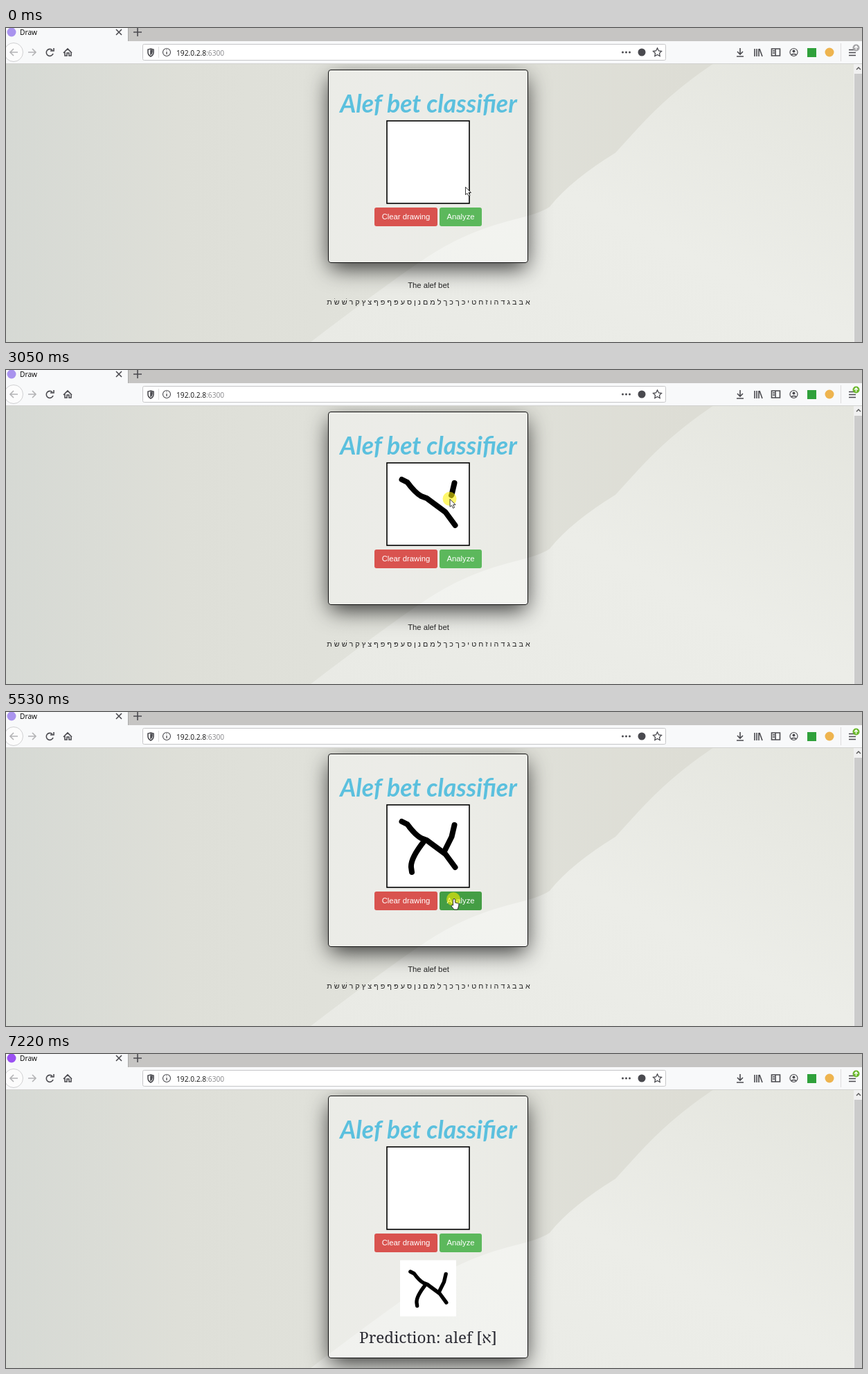
Animation, 1236 px wide and 453 px high, one loop 7.86 s. Source, as an HTML page:

```html
<!DOCTYPE html>
<html lang="en">
<head>
<meta charset="utf-8">
<title>Draw</title>
<style>
  html, body { margin: 0; width: 100%; height: 100%; overflow: hidden; }
  svg { position: absolute; left: 0; top: 0; width: 1236px; height: 453px; }
  text { font: 11.3px "Liberation Sans", Arial, sans-serif; }
  .mid { text-anchor: middle; }
  .ui { font: 10.2px "Open Sans", "Noto Sans", sans-serif; }
  .title { font: italic 700 35.6px Lato, sans-serif; fill: #5bc0de; }
  .letters { font-size: 10.8px; }
  .result { font: 22.5px "Noto Serif", serif; fill: #2b2b33; }
  .icon { fill: none; stroke: #4a4a4f; stroke-width: 1.6; }
  .ink { fill: none; stroke: #000; stroke-width: 8; stroke-linecap: round; stroke-linejoin: round; }
  #copy { filter: blur(.6px); }
  #panel {
    position: absolute; left: 465px; top: 60px; width: 289px; box-sizing: border-box;
    border: 1px solid #111; border-radius: 4px; background: rgba(255, 255, 255, .34);
    box-shadow: 0 10px 32px -3px rgba(0, 0, 0, .8);
  }
</style>
</head>
<body>
<svg viewBox="0 0 1236 453">
  <defs>
    <linearGradient id="wall">
      <stop offset="0" stop-color="#d6d9d4"/>
      <stop offset=".2" stop-color="#dedfd8"/>
      <stop offset=".45" stop-color="#e1e2db"/>
      <stop offset=".8" stop-color="#dddDD5"/>
    </linearGradient>
    <linearGradient id="hill" x1="0" y1="1" x2="1" y2="0">
      <stop offset="0" stop-color="#e9eae5"/>
      <stop offset=".5" stop-color="#ecede8"/>
      <stop offset="1" stop-color="#e4e5de"/>
    </linearGradient>
  </defs>
  <path fill="url(#wall)" d="M0 51H1236V453H0z"/>
  <path fill="url(#hill)" d="M1022 51Q960 92 912 145L880 180Q815 220 785 258Q770 268 735 276Q670 292 620 323T440 453H1236V51z"/>
</svg>

<div id="panel"></div>

<svg viewBox="0 0 1236 453">
  <!-- browser chrome -->
  <path fill="#c6c5c3" d="M0 0H1236V19H0z"/>
  <path fill="#f8f9fa" d="M0 0H176V19H1236V51H0z"/>
  <path stroke="#a9a9a9" d="M176.5 0V19"/>
  <path stroke="#d2d2d0" d="M0 51.5H1236"/>
  <circle id="burst" cx="8" cy="6" fill="#6db3ff"/>
  <circle id="favicon" cx="8" cy="6" r="6.5"/>
  <text class="ui" x="20" y="10">Draw</text>
  <g class="icon">
    <path d="M159 2l8 8m0-8l-8 8M184 6h12m-6-6v12"/>
    <g stroke="#b4b4b6">
      <circle cx="11" cy="35" r="13.5" stroke="#d0d0d2" stroke-width="1" fill="#fcfcfc"/>
      <path d="M17 35H6m5-5l-5 5 5 5M32 35H43m-5-5l5 5-5 5"/>
    </g>
    <path id="reload" d="M67 32A5 5 0 1 0 68 37M69 29v4h-5"/>
    <path id="stop" stroke="#8a8a8e" d="M58 30l10 10m0-10l-10 10"/>
    <path d="M83 36l6-6 6 6M85 35v5h3v-4h3v4h3v-5"/>
    <rect x="197.5" y="23.5" width="755" height="23" rx="2" fill="#fff" stroke="#c6c6c8" stroke-width="1"/>
    <path d="M209 30l4 1v4q0 4-4 6-4-2-4-6v-4z"/>
    <path d="M209 32v6q2-1 2-4v-2z" fill="#4a4a4f"/>
    <path stroke="#ddd" stroke-width="1" d="M220.5 27v16M1205.5 22v26"/>
    <circle cx="232" cy="35" r="5.5" stroke-width="1.1"/>
    <path stroke-width="1.3" d="M232 34v4m0-7v1"/>
    <path stroke-width="3" stroke-linecap="round" stroke-dasharray="0 5" d="M890.5 35h11"/>
    <circle cx="918" cy="35" r="5.5" fill="#4a4a4f" stroke="none"/>
    <path stroke-width="1.3" d="M940.5 29l2 4 4 .5-3 3 .7 4-3.7-2-3.7 2 .7-4-3-3 4-.5z"/>
    <path d="M1060 29v9m-4-4l4 4 4-4M1055 41h10"/>
    <path d="M1081 30v11m3-11v11m3-11v11m1-11l4 11"/>
    <path d="M1105.5 30h12v10h-12zM1111 30v10m-4-7h3m-3 3h3"/>
    <circle cx="1137.5" cy="35" r="5.5" stroke-width="1.2"/>
    <circle cx="1137.5" cy="33.5" r="2" fill="#4a4a4f" stroke="none"/>
    <path d="M1134 38.5q3.5-2 7 0"/>
    <path d="M1217 31.5h10m-10 4h10m-10 4h10"/>
  </g>
  <path fill="#2fa13b" d="M1157 29h13v13h-13z"/>
  <circle cx="1189" cy="35" r="6.5" fill="#eeb44f"/>
  <circle id="badge" cx="1227.5" cy="28.5" r="5"/>
  <path fill="none" stroke="#fff" stroke-width="1.4" d="M1227.5 31.5v-5m-2.5 2l2.5-2.5 2.5 2.5"/>
  <text class="ui" x="246" y="39.5" fill="#111">192.0.2.8<tspan fill="#858588">:6300</tspan></text>

  <!-- scrollbar -->
  <path fill="#f0f0f0" d="M1224 52h12V453h-12z"/>
  <path fill="#cbcbcb" d="M1225 66h11V453h-11z"/>
  <path fill="none" stroke="#555" stroke-width="1.4" d="M1228 60l3-3 3 3"/>

  <!-- page -->
  <text class="title mid" x="610" y="122">Alef bet classifier</text>
  <rect x="550" y="134" width="119" height="119" fill="#fff" stroke="#000" stroke-width="1.6"/>
  <g id="sketch" class="ink"></g>
  <rect x="532" y="259" width="91" height="27" rx="3" fill="#d9534f"/>
  <rect id="analyze" x="626" y="259" width="61" height="27" rx="3"/>
  <g class="mid" fill="#fff">
    <text x="577.5" y="276">Clear drawing</text>
    <text x="656.5" y="276">Analyze</text>
  </g>
  <g id="before" class="mid" fill="#222">
    <text x="610" y="375">The alef bet</text>
    <text class="letters" x="610" y="399" direction="rtl">א בּ ב ג ד ה ו ז ח ט י כּ ך כ ך ל מ ם נ ן ס ע פּ ף פ ף צ ץ ק ר שׁ שׂ ת</text>
  </g>
  <g id="after">
    <path fill="#fff" d="M569 297.5h81v81h-81z"/>
    <g id="copy" class="ink" transform="translate(569 297.5) scale(.675) translate(-549.5 -133.5)"></g>
    <text class="result mid" x="609.5" y="417">Prediction: alef [א]</text>
  </g>

  <!-- pointer -->
  <g id="pointer">
    <circle id="glow" r="10" fill="#fff200" opacity=".58"/>
    <g fill="#fff" stroke="#222" stroke-width=".9">
      <path id="arrow" d="M.5.5v11l2.5-2 2 4 2-1-2-4h3.500z"/>
      <path id="hand" d="M-.5 9V1a1.400 1.400 0 0 1 3 0V5l4 1q1.500.5 1.500 2l-1 4-1 3H1L-3 10q0-2 1-1.500z"/>
    </g>
  </g>
</svg>

<script>
const LOOP = 7860, SENT = 5850, CLICK = 5480, INK_LAG = 40;
const $ = id => document.getElementById(id);
const show = (id, on) => $(id).style.display = on ? "" : "none";
const within = (t, a, b) => t >= a && t < b;

function newPath(d) {
  const path = document.createElementNS("http://www.w3.org/2000/svg", "path");
  path.setAttribute("d", d);
  return path;
}

// The pointer's journey: plain moves and pen strokes, each eased over its own time.
const acts = [];
let last = { x: 663, y: 229 };

function add(from, to, path, pen) {
  const length = path.getTotalLength();
  acts.push({ from, to, path, length, pen });
  last = path.getPointAtLength(length);
}
function move(from, to, x, y) {
  add(from, to, newPath(`M${last.x} ${last.y}L${x} ${y}`), false);
}
function stroke(from, to, d) {
  const path = newPath(d);
  $("copy").append(path.cloneNode());
  $("sketch").append(path);
  add(from, to, path, true);
}

move(89, 90, 625, 215);
move(310, 600, 571, 158);
stroke(760, 1420, "M571.5 158l8 4q11 15 20 20l8 3 27 20 14 19");
move(1600, 1950, 648, 186);
move(2020, 2660, 649, 160);
stroke(2810, 3250, "M647.5 163l-4 17-11 22");
move(3450, 3750, 605, 187);
stroke(4080, 4750, "M604 186q-20 25-19 38l1 7");
move(4930, 5350, 646, 270);
move(6370, 6840, 1045, 416);
move(7100, 7160, 1131, 444);

function progress(act, t) {
  const p = Math.min(1, Math.max(0, (t - act.from) / (act.to - act.from)));
  return p * p * (3 - 2 * p);
}

function pointerAt(t) {
  const act = acts.findLast(a => a.from <= t) || acts[0];
  return act.path.getPointAtLength(act.length * progress(act, t));
}

function draw(t) {
  const sent = t >= SENT;
  const { x, y } = pointerAt(t);
  const hover = within(x, 626, 687) && within(y, 259, 286);

  show("before", !sent);
  show("sketch", !sent);
  show("after", sent);
  $("panel").style.height = (sent ? 379 : 279) + "px";

  const strokes = acts.filter(a => a.pen);
  for (const act of strokes) {
    const share = progress(act, t - INK_LAG);
    act.path.style.display = share > 0 ? "" : "none";
    act.path.style.strokeDasharray = `${share * act.length + .01} 999`;
  }

  $("favicon").setAttribute("fill", sent ? "#9a50f2" : "#a993ee");
  $("badge").setAttribute("fill", t < 480 ? "#a5a5a8" : "#6cb82e");
  $("analyze").setAttribute("fill", hover ? "#449d44" : "#5cb85c");

  const loading = within(t, 5610, 6650);
  show("stop", loading);
  show("reload", !loading);

  const spread = (t - SENT) / 400;
  show("burst", within(spread, 0, 1));
  $("burst").setAttribute("r", Math.max(0, 6 + 26 * spread));
  $("burst").setAttribute("opacity", 1 - spread * .8);

  show("pointer", t < 7220);
  show("hand", hover);
  show("arrow", !hover);
  show("glow", within(t, CLICK, CLICK + 210) || strokes.some(a => within(t, a.from, a.to + 150)));
  $("pointer").setAttribute("transform", `translate(${x} ${y})`);
}

function tick() {
  draw(performance.now() % LOOP);
  requestAnimationFrame(tick);
}
tick();
</script>
</body>
</html>
```
